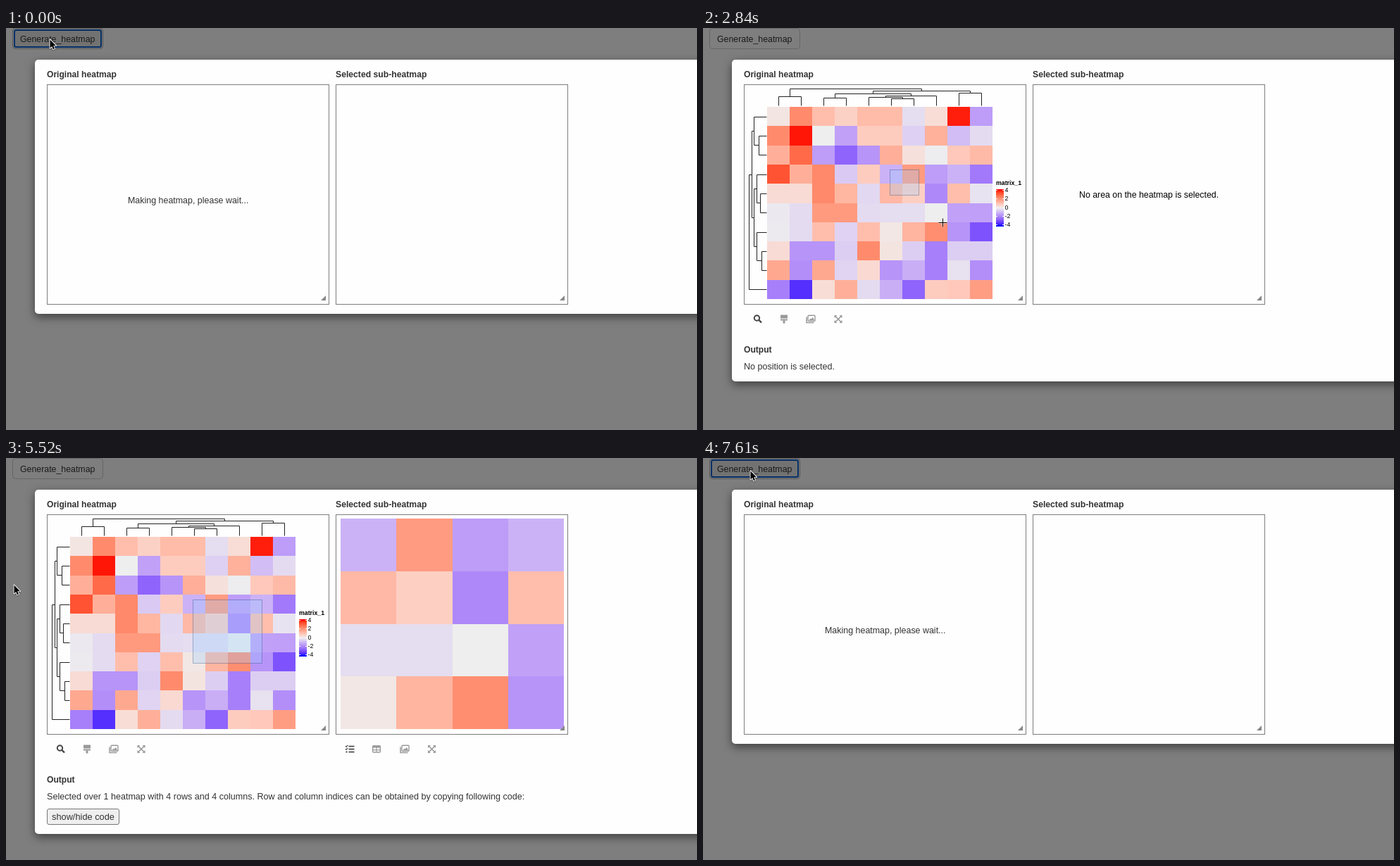
Animation, 981 px wide and 571 px high, one loop 8 s. Source, as an HTML page with a canvas:

```html
<!DOCTYPE html>
<html lang="en">
<head>
<meta charset="utf-8">
<title>Interactive heatmap</title>
<style>
html, body { margin: 0; width: 100%; height: 100%; overflow: hidden; background: #fefefe; }
canvas { display: block; }
</style>
</head>
<body>
<canvas id="stage" width="981" height="571"></canvas>
<script>
const ctx = document.getElementById('stage').getContext('2d');
const W = 981, H = 571, LOOP = 8000;
const SANS = '"Liberation Sans", Arial, sans-serif';
const MONO = '"DejaVu Sans Mono", monospace';

// Cell values in percent of the colour range
const N = 10;
const VALUES = [
  5, 56, 28, 17, 29, 29, -8, 10, 97, -38,
  56, 98, 0, -36, 20, 20, -14, 35, -23, -9,
  36, 72, -38, -65, -42, 36, 8, -1, 22, 30,
  82, 36, 57, -17, 20, -28, 47, -38, -28, -55,
  11, 11, 57, 32, -10, 31, 18, -48, 28, -5,
  -3, -9, 48, 48, -9, -8, -8, 0, -36, -37,
  -2, -9, 28, -13, 28, 4, 33, 54, -42, -73,
  11, -42, -42, -15, 56, 6, -15, -52, -15, -15,
  40, -45, 40, -12, 12, -42, -30, -52, -6, -45,
  -52, -88, 10, 36, -9, -30, -65, 20, 22, 46
];
// Joins: two positions and the height of the bar
const COL_TREE = [[107, 139, 97], [171, 203, 99], [267, 299, 100], [235, 283, 98], [259, 331, 96],
  [187, 295, 93], [363, 395, 92], [241, 379, 89], [123, 310, 86]];
const ROW_TREE = [[153, 180, 79], [126, 166, 72], [235, 262, 81], [208, 248, 76], [317, 344, 83],
  [290, 330, 76], [228, 310, 72], [146, 269, 69], [208, 371, 65]];

// Pointer: time, x, y
const POINTER = [
  [0, 62, 16], [300, 55, 52], [440, 52, 77], [1490, 112, 190], [1640, 163, 264],
  [1940, 185, 247], [2090, 224, 223], [2240, 252, 208], [2390, 265, 202],
  [2690, 307, 237], [2840, 340, 276], [2990, 354, 285], [3140, 361, 289], [3290, 364, 291],
  [4320, 350, 401], [4920, 300, 365], [5070, 180, 275], [5220, 70, 200], [5370, 20, 175],
  [5520, 11, 180], [6420, 18, 140], [6570, 38, 75], [6720, 58, 28], [6870, 67, 18]
];

const within = (t, a, b) => t >= a && t < b;
const step = (keys, t) => keys.findLastIndex(k => k[0] <= t);

// Blend from light grey to blue or red in Lab space
function heat(v) {
  const end = v < 0 ? [32.3, 79.2, -107.9] : [53.2, 80.1, 67.2], t = Math.abs(v);
  const fy = (94.1 + (end[0] - 94.1) * t + 16) / 116;
  const cube = f => f > 0.2069 ? f ** 3 : (f - 16 / 116) / 7.787;
  const x = cube(fy + end[1] * t / 500) * 0.9505, y = cube(fy), z = cube(fy - end[2] * t / 200) * 1.0888;
  const rgb = [3.2406 * x - 1.5372 * y - 0.4986 * z, -0.9689 * x + 1.8758 * y + 0.0415 * z,
    0.0557 * x - 0.204 * y + 1.057 * z];
  return `rgb(${rgb.map(c => {
    c = Math.min(1, Math.max(0, c));
    return Math.round(255 * (c > 0.0031 ? 1.055 * c ** (1 / 2.4) - 0.055 : 12.92 * c));
  })})`;
}
const CELLS = VALUES.map(v => heat(v / 100));

function rect(x, y, w, h, fill) {
  ctx.fillStyle = fill;
  ctx.fillRect(x, y, w, h);
}

function box(x, y, w, h, r, fill, stroke, line = 1) {
  ctx.beginPath();
  ctx.roundRect(x, y, w, h, r);
  if (fill) { ctx.fillStyle = fill; ctx.fill(); }
  if (stroke) { ctx.strokeStyle = stroke; ctx.lineWidth = line; ctx.stroke(); }
}

function text(str, x, y, size = 12.55, color = '#333', weight = '', family = SANS) {
  ctx.font = `${weight} ${size}px ${family}`;
  ctx.fillStyle = color;
  ctx.fillText(str, x, y);
}

function path(points, close) {
  ctx.beginPath();
  points.forEach(([x, y]) => ctx.lineTo(x, y));
  if (close) ctx.closePath();
}

function line(points, color, width = 1) {
  path(points);
  ctx.strokeStyle = color;
  ctx.lineWidth = width;
  ctx.stroke();
}

function cells(c0, r0, n, x, y, w, h) {
  for (let r = 0; r < n; r++) for (let c = 0; c < n; c++) {
    const left = Math.round(x + c * w), top = Math.round(y + r * h);
    rect(left, top, Math.round(x + (c + 1) * w) - left, Math.round(y + (r + 1) * h) - top,
      CELLS[(r0 + r) * N + c0 + c]);
  }
}

// A join hangs on the joins below it, or on a leaf
function tree(joins, leaf, flip) {
  joins.forEach(([a, b, top], i) => {
    const foot = p => {
      const below = joins.slice(0, i).filter(j => Math.abs((j[0] + j[1]) / 2 - p) < 1.5).pop();
      return below ? below[2] : leaf;
    };
    const pts = [[a, foot(a)], [a, top], [b, top], [b, foot(b)]];
    line(pts.map(p => (flip ? [p[1], p[0]] : p).map(v => Math.floor(v) + 0.5)), '#222');
  });
}

function legend() {
  text('matrix_1', 416, 223, 8.75, '#000', 'bold');
  for (let i = 0; i < 53; i++) rect(416, 229 + i, 11, 1, heat(Math.max(-1, Math.min(1, (26 - i) / 25))));
  [4, 2, 0, -2, -4].forEach((v, i) => {
    const y = 230 + i * 12.3;
    rect(416, Math.round(y), 2, 1, '#fff');
    rect(425, Math.round(y), 2, 1, '#fff');
    text(v, 428.5, y + 3, 8.75, '#000');
  });
}

function heatmap() {
  cells(0, 0, N, 91, 112, 32, 27.3);
  tree(COL_TREE, 110, false);
  tree(ROW_TREE, 90, true);
  legend();
}

function panel(x, w) {
  ctx.strokeStyle = '#7d7d7d';
  ctx.lineWidth = 1;
  ctx.strokeRect(x + 0.5, 80.5, w, 312);
}

function grip(x) {
  path([[x, 380], [x, 387], [x - 7, 387]], true);
  ctx.fillStyle = '#888';
  ctx.fill();
}

const GREY = '#999', DARK = '#444';
const ICONS = {
  search() {
    ctx.beginPath();
    ctx.arc(-1, -1.5, 3.7, 0, 7);
    ctx.strokeStyle = DARK;
    ctx.lineWidth = 2;
    ctx.stroke();
    line([[2, 1.5], [5.5, 5]], DARK, 2.4);
  },
  brush() {
    rect(-5, -6, 10, 5, GREY);
    rect(-5, 0, 10, 2, GREY);
    rect(-1.5, 2, 3, 4, GREY);
  },
  images() {
    box(-4, -5.2, 10, 8, 1, null, GREY, 1.4);
    line([[-6, -3], [-6, 5], [4.5, 5]], GREY, 1.5);
    path([[-2.5, 1.5], [-0.5, -1], [0.5, 0], [3, -2.5], [5, 1.5]], true);
    ctx.fillStyle = GREY;
    ctx.fill();
  },
  expand() {
    line([[-4, -4], [4, 4]], GREY, 1.6);
    line([[4, -4], [-4, 4]], GREY, 1.6);
    for (const sx of [-1, 1]) for (const sy of [-1, 1]) {
      path([[sx * 5.5, sy * 5.5], [sx * 5.5, sy * 1.6], [sx * 1.6, sy * 5.5]], true);
      ctx.fillStyle = GREY;
      ctx.fill();
    }
  },
  tasks() {
    for (const y of [-4, 0, 4]) {
      rect(-1.5, y - 0.8, 8, 1.7, DARK);
      if (y < 4) line([[-6, y - 0.3], [-5, y + 0.9], [-2.8, y - 1.6]], DARK, 1.2);
      else rect(-5.5, y - 1, 2, 2, DARK);
    }
  },
  table() {
    box(-5.3, -4.5, 10.6, 9, 1, null, GREY, 1.4);
    rect(-5.5, -5, 11, 3, GREY);
    rect(-0.6, -4, 1.2, 8, GREY);
    rect(-5, 0.6, 10, 1.2, GREY);
  }
};

function icons(list) {
  for (const [name, x] of list) {
    ctx.save();
    ctx.translate(x, 413.5);
    ICONS[name]();
    ctx.restore();
  }
}

function mainButton(t) {
  const focus = t < 2690 || t >= 7170;
  const hover = within(t, 6720, 7170);
  const fill = focus || hover ? '#e6e6e6' : '#fefefe';
  box(9.5, 0.5, 128, 29, 4, fill, focus || hover ? '#adadad' : '#ccc');
  if (focus) {
    box(10.5, 1.5, 126, 27, 4, null, '#fff');
    box(12, 3, 123, 24, 2.5, null, '#0a5fd0', 2);
  }
  text('Generate_heatmap', 20, 20, 12.35);
}

function output(t) {
  text('Output', 58, 461, 12.1, '#333', 'bold');
  if (t < 3580) return text('No position is selected.', 58, 485);
  if (t < 4470) {
    text('Information of the clicked cell:', 58, 485);
    box(58.5, 498.5, 1000, 200, 4, '#f5f5f5', '#ccc');
    ['heatmap: matrix_1', 'heatmap slice: matrix_1_heatmap_body_1_1', 'row index: 8', 'row label: NULL']
      .forEach((s, i) => text(s, 68, 519 + i * 15.9, 11.46, '#333', '', MONO));
    return;
  }
  text('Selected over 1 heatmap with 4 rows and 4 columns. Row and column indices can be ' +
    'obtained by copying following code:', 58, 485, 12.58);
  box(58.5, 498.5, 102, 22, 2.5, '#efefef', '#767676');
  text('show/hide code', 65, 514, 12.8);
}

function brush(t) {
  if (t < 2690) return;
  // The drawn area trails the pointer by one move
  const [, x, y] = POINTER[Math.min(step(POINTER, t), 13) - (t < 3290 ? 1 : 0)];
  ctx.save();
  ctx.globalAlpha = 0.3;
  box(265.5, 201.5, Math.max(0, x - 266), Math.max(0, y - 201), 0, '#9cf', '#036');
  ctx.restore();
}

function modal(t) {
  const bottom = within(t, 1340, 1490) ? 445 : within(t, 1490, 3580) ? 502
    : within(t, 3580, 4470) ? 760 : within(t, 4470, 5970) ? 534 : 406;
  ctx.save();
  if (within(t, 7460, 7610)) {
    ctx.globalAlpha = 0.6;
    ctx.translate(0, -40);
  }
  ctx.save();
  ctx.shadowColor = 'rgba(0,0,0,.5)';
  ctx.shadowBlur = 13;
  ctx.shadowOffsetY = 4.5;
  box(41, 45, 1200, bottom - 45, 5, '#fefefe');
  ctx.restore();

  const ready = within(t, 1490, 7000);
  text('Original heatmap', 58, 70, 12.1, '#333', 'bold');
  text('Selected sub-heatmap', 468, 70, 12.2, '#333', 'bold');
  if (ready) {
    heatmap();
    brush(t);
    if (t < 4470) text('No area on the heatmap is selected.', 534, 241, 12.33, '#000');
    else cells(5, 3, 4, 475, 86, 79.25, 74.75);
    output(t);
  } else {
    text('Making heatmap, please wait...', 173, 249, 12.45);
  }
  panel(58, 400);
  panel(468, 329);
  grip(454);
  grip(793);
  if (within(t, 1340, 7000)) icons([['search', 77.5], ['brush', 115], ['images', 153], ['expand', 192]]);
  if (within(t, 3880, 7000)) icons([['tasks', 488], ['table', 526], ['images', 566], ['expand', 604.5]]);
  ctx.restore();
}

function pointer(t) {
  const [, x, y] = POINTER[step(POINTER, t)];
  ctx.save();
  ctx.translate(x, y);
  if (within(t, 1490, 4320)) {
    ctx.translate(0.5, 0.5);
    for (const [color, w] of [['rgba(255,255,255,.6)', 2.5], ['#000', 1]]) {
      line([[-6, 0], [6, 0]], color, w);
      line([[0, -6], [0, 6]], color, w);
    }
  } else {
    path([[0.5, 0.5], [0.5, 12.5], [3.2, 10], [5, 14.2], [7, 13.3], [5.2, 9.2], [9, 9.2]], true);
    ctx.lineJoin = 'round';
    ctx.strokeStyle = '#fff';
    ctx.lineWidth = 1.8;
    ctx.shadowColor = 'rgba(0,0,0,.35)';
    ctx.shadowBlur = 2;
    ctx.shadowOffsetY = 1;
    ctx.stroke();
    ctx.shadowColor = 'transparent';
    ctx.fillStyle = '#000';
    ctx.fill();
  }
  ctx.restore();
}

function draw(now) {
  const t = now % LOOP;
  rect(0, 0, W, H, '#fefefe');
  mainButton(t);
  if (!within(t, 5970, 7460)) {
    rect(0, 0, W, H, 'rgba(0,0,0,.5)');
    modal(t);
  }
  pointer(t);
}

const start = performance.now();
function tick() {
  draw(performance.now() - start);
  requestAnimationFrame(tick);
}
tick();
</script>
</body>
</html>
```
